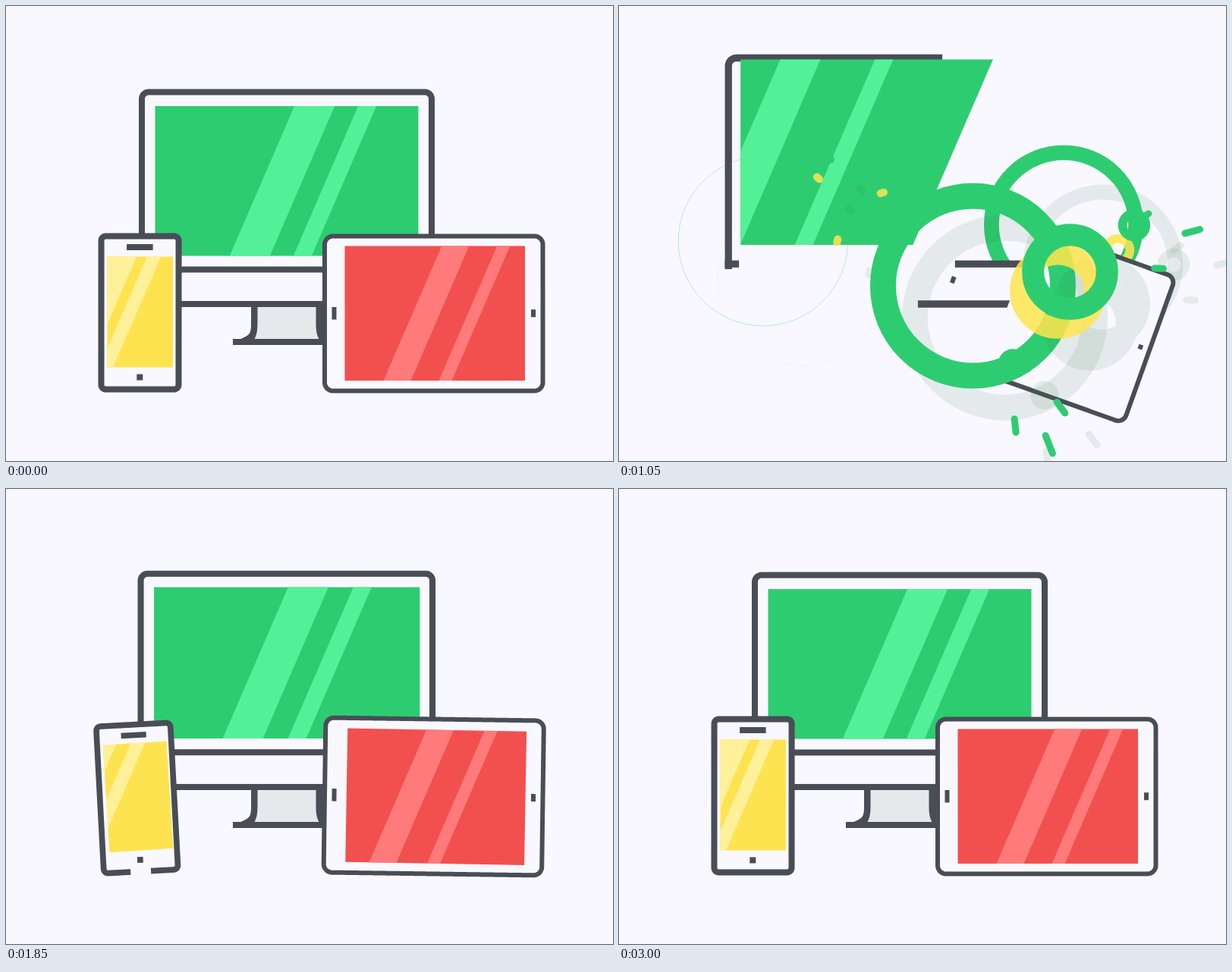
An HTML page with a canvas for the animation above (3.05 s loop, 800 px wide and 600 px high).

```html
<!DOCTYPE html>
<html lang="en">
<head>
<meta charset="utf-8">
<title>Devices</title>
<style>
html, body { margin: 0; width: 100%; height: 100%; overflow: hidden; background: #f8f8fe; }
canvas { display: block; }
</style>
</head>
<body>
<canvas id="stage" width="800" height="600"></canvas>
<script>
const ctx = document.getElementById('stage').getContext('2d');
const BG = '#f8f8fe', INK = '#494d56', GREEN = '#2ecc71';
const YELLOW = 'rgba(255,229,78,.85)', SHADE = 'rgba(50,110,70,.1)';
const LOOP = 3050, STEP = 50, SLOPE = 0.432;

const clamp = v => Math.max(0, Math.min(1, v));
const out2 = p => 1 - (1 - p) ** 2;
const out3 = p => 1 - (1 - p) ** 3;
const rad = a => a * Math.PI / 180;

// Damped spring: still until 200 ms before its peak, 1 at the peak.
const swing = (t, peak) => t < peak - 200 ? 0
  : Math.exp((peak - t) / 250) * Math.cos(Math.PI * (t - peak) / 400);

// What is left of a quintic ease-out lasting two seconds.
const glide = (t, start) => (1 - clamp((t - start) / 2000)) ** 5;

// Length drawn so far of a line growing at a steady speed.
const drawn = (t, start, speed, max) => Math.max(0, Math.min(max, (t - start) * speed));

function around(px, py, { s = 1, rot = 0, dx = 0, dy = 0 }, draw) {
  ctx.save();
  ctx.translate(px + dx, py + dy);
  ctx.rotate(rad(rot));
  ctx.scale(s, s);
  ctx.translate(-px, -py);
  draw();
  ctx.restore();
}

// Point at distance d, clockwise from the top-left corner of a rounded box.
function edgePoint(x, y, w, h, r, d) {
  const arc = Math.PI * r / 2;
  const corners = [[x + r, y + r], [x + w - r, y + r], [x + w - r, y + h - r], [x + r, y + h - r]];
  const total = 2 * (w + h) - 8 * r + 4 * arc;
  d = ((d + arc / 2) % total + total) % total;
  for (let i = 0; i < 4; i++) {
    const [cx, cy] = corners[i], a = i * Math.PI / 2;
    const side = (i % 2 ? h : w) - 2 * r;
    if (d <= arc) return [cx - r * Math.cos(a + d / r), cy - r * Math.sin(a + d / r)];
    d -= arc;
    if (d <= side) return [cx + r * Math.sin(a) + d * Math.cos(a), cy - r * Math.cos(a) + d * Math.sin(a)];
    d -= side;
  }
  return [x, y + r];
}

function outline(box, from, to, width, fill) {
  const [, , w, h, r] = box;
  const total = 2 * (w + h) - 8 * r + 2 * Math.PI * r;
  if (to <= from) return;
  const length = Math.min(total, to - from), n = Math.ceil(length / 1.5);
  ctx.beginPath();
  for (let i = 0; i <= n; i++) ctx.lineTo(...edgePoint(...box, from + length * i / n));
  if (length === total) ctx.closePath();
  if (fill) { ctx.fillStyle = BG; ctx.fill(); }
  ctx.lineWidth = width;
  ctx.lineCap = 'butt';
  ctx.strokeStyle = INK;
  ctx.stroke();
}

function slab(cx, cy, w, h) {
  ctx.fillStyle = INK;
  ctx.fillRect(cx - w / 2, cy - h / 2, w, h);
}

// Slanted strip whose edges cross left and right at height y.
function band(left, right, y, color) {
  if (right <= left) return;
  ctx.beginPath();
  ctx.moveTo(left + SLOPE * y, 0);
  ctx.lineTo(right + SLOPE * y, 0);
  ctx.lineTo(right + SLOPE * (y - 600), 600);
  ctx.lineTo(left + SLOPE * (y - 600), 600);
  ctx.fillStyle = color;
  ctx.fill();
}

function screen({ box, pivot, pose, fill, light, y, wipe, x, gap, lag, widths }) {
  ctx.save();
  ctx.beginPath();
  around(...pivot, pose, () => ctx.rect(...box));
  ctx.clip();
  const first = x - lag, second = first + gap + lag * .21;
  band(-900, wipe, y, fill);
  band(first, Math.min(wipe, first + widths[0]), y, light);
  band(second, Math.min(wipe, second + widths[1]), y, light);
  ctx.restore();
}

// Strokes shadow, yellow and green copies; both shadows merge into one shape.
function layers(shade, tint, trace) {
  const paint = (color, ...offsets) => {
    ctx.beginPath();
    for (const [dx, dy] of offsets) trace(dx, dy);
    ctx.strokeStyle = color;
    ctx.stroke();
  };
  if (tint) {
    paint(SHADE, shade, [shade[0] + tint[0], shade[1] + tint[1]]);
    paint(YELLOW, tint);
  } else paint(SHADE, shade);
  paint(GREEN, [0, 0]);
}

function ring(t, start, span, x, y, max, thick, shade, tint) {
  const p = (t - start) / span;
  if (p <= 0 || p >= 1) return;
  const outer = max * out3(p), w = Math.min(outer, thick * (1 - p)), r = outer - w / 2;
  ctx.lineWidth = w;
  layers(shade, tint, (dx, dy) => {
    ctx.moveTo(x + dx + r, y + dy);
    ctx.arc(x + dx, y + dy, r, 0, 2 * Math.PI);
  });
}

// Three lines flying out; the outer two reach a share of the middle one.
function rays(t, start, span, x, y, angle, spread, reach, share, width, shade, tint) {
  const p = (t - start) / span;
  if (p <= 0 || p >= 1) return;
  const w = width * Math.min(1, 3 * (1 - p));
  ctx.lineWidth = w;
  ctx.lineCap = 'round';
  layers(shade, tint, (dx, dy) => {
    for (const i of [-1, 0, 1]) {
      const a = rad(angle + i * spread), c = Math.cos(a), s = Math.sin(a);
      const far = i ? reach * share : reach;
      const tip = far * out3(p) - w / 2, tail = Math.min(tip, far * out2(p) + w / 2);
      ctx.moveTo(x + dx + tail * c, y + dy + tail * s);
      ctx.lineTo(x + dx + tip * c, y + dy + tip * s);
    }
  });
}

function drawStand(t) {
  const s = out3(clamp((t - 1150) / 220));
  if (!s) return;
  around(0, 0, { s, dx: 370, dy: 393 }, () => {
    ctx.fillStyle = '#e6e8ec';
    ctx.fillRect(-43, 0, 86, 47);
    ctx.fillStyle = INK;
    ctx.fillRect(-71, 46, 142, 8);
    for (const side of [-1, 1]) {
      ctx.save();
      ctx.scale(side, 1);
      ctx.beginPath();
      ctx.moveTo(38.5, 0);
      ctx.lineTo(47, 0);
      ctx.lineTo(47, 26);
      ctx.bezierCurveTo(47, 40, 49, 41, 63, 47);
      ctx.lineTo(43, 47);
      ctx.bezierCurveTo(40, 42, 38.5, 36, 38.5, 26);
      ctx.fill();
      ctx.restore();
    }
  });
}

function drawMonitor(t) {
  const start = 720, k = swing(t, 1050);
  if (t < start) return;
  const box = [179, 113.5, 382, 279.5, 9], right = 561, chinY = 347.5, base = 393;
  const half = 382 + 279.5 - 4 * 9 + Math.PI * 9;
  const left = drawn(t, start, .73, 238), top = drawn(t, start, .73, half);
  const bottom = drawn(t, start, .5, 382), up = drawn(t, start, .6, 85);
  const chin = drawn(t, 930, 1.04, 382);
  const pose = { s: 1 + .161 * k, dx: 23 * Math.exp((800 - t) / 60) - 4.4 * k };
  around(370, base, pose, () => {
    ctx.fillStyle = BG;
    if (chin === 382) ctx.fillRect(...box.slice(0, 4));
    ctx.beginPath();
    ctx.moveTo(right - chin, chinY);
    ctx.lineTo(right, chinY);
    ctx.lineTo(right, base);
    ctx.lineTo(right - bottom, base);
    if (chin) ctx.fill();
    outline(box, -left, top, 8);
    outline(box, half - up, half + bottom, 8);
    slab(right - chin / 2, chinY, chin, 8);
    if (left === 238) slab(183, chinY, 16, 8);
  });
  screen({
    box: [196.5, 132, 347, 197.5], pivot: [370, 390],
    pose: { s: 1 + .238 * k, dx: 5 * k },
    fill: GREEN, light: '#54f098', y: 230, wipe: 424 + (t - 1050) * 2.5,
    x: 337.8, gap: 84, lag: 368 * glide(t, 810), widths: [53, 24]
  });
}

function drawTablet(t) {
  const half = drawn(t, 917, 2.2, 483), mid = 386;
  if (!half) return;
  const k = swing(t, 1450), grow = clamp((t - 900) / 350);
  const place = draw => around(563.6, 405.5, { rot: 19.7 * swing(t, 1050) }, draw);
  place(() => outline([420, 303.5, 287.5, 204, 11], mid - half, mid + half, 6, true));
  screen({
    box: [446.5, 316.5, 237.5, 177.5], pivot: [565.2, 405.3],
    pose: { s: 1 + .035 * k, rot: -4.9 * k, dx: -7 * k, dy: -2.5 * k },
    fill: '#f2504f', light: '#ff7b7b', y: 405, wipe: 676 + (t - 1450) * .9,
    x: 536, gap: 73, lag: 185 * glide(t, 1127), widths: [36, 17]
  });
  place(() => {
    slab(432.5, 405.2, 6, 3 + 13.5 * grow);
    slab(695, 405.3, 6, 3 + 7 * grow);
  });
}

function drawPhone(t) {
  const half = 300 * out3(clamp((t - 1220) / 1000)), mid = 50;
  if (!half) return;
  const k = swing(t, 1450), grow = clamp((t - 1250) / 360);
  const place = draw => around(176, 478, { s: 1 + .2 * k, rot: 15 * k }, draw);
  place(() => outline([125.5, 303.5, 102, 202, 6], mid - half, mid + half, 8, true));
  screen({
    box: [133.5, 330.5, 86.5, 146], pivot: [176, 478],
    pose: { s: 1 + .145 * k, rot: 18 * k, dx: -9 * k },
    fill: '#fee350', light: '#fff09a', y: 404, wipe: 200 + (t - 1450),
    x: 100.5, gap: 53.5, lag: 267 * glide(t, 1090), widths: [40, 18.5]
  });
  place(() => {
    slab(176.3, 318, 34.5 * grow, 8);
    slab(176.3, 489.5, 8 * grow, 8);
  });
}

function render(t) {
  const far = [52, 52], near = [42, 42], low = [24, -21];
  ctx.fillStyle = BG;
  ctx.fillRect(0, 0, 800, 600);

  ring(t, 707, 340, 399, 298, 227, 47, far, [-21, 33]);
  ring(t, 776.5, 278, 190, 310, 112, 20, far);
  ring(t, 870, 400, 586, 288.5, 126, 36, far);
  ring(t, 1020, 290, 679, 289, 76, 13, far, [-21, 33]);

  drawStand(t);
  drawMonitor(t);
  drawTablet(t);

  rays(t, 960, 400, 314, 235, 103, 120, 107, 1, 10, near, [-15, 26]);
  ring(t, 784.5, 640, 466.5, 369, 169.5, 58, near);
  ring(t, 960, 460, 594.5, 350.5, 132, 36, near, [-16, 25]);
  ring(t, 1020, 380, 519, 471, 86, 50, near);
  rays(t, 870, 400, 596, 340, -15, 18, 216, .7, 9, near);
  rays(t, 900, 400, 508, 429, 68.5, 15, 235, .78, 9, near);

  ring(t, 1290, 350, 188, 434, 74, 20, low, [16, 10]);
  rays(t, 1265, 500, 182, 453, 135, 17, 167, .71, 5, low);
  drawPhone(t);
}

const begin = performance.now();
function tick() {
  const t = Math.floor((performance.now() - begin) % LOOP / STEP) * STEP;
  // The finished picture rests before the build-up starts again.
  render(t < 600 ? LOOP : t);
  requestAnimationFrame(tick);
}
tick();
</script>
</body>
</html>
```
